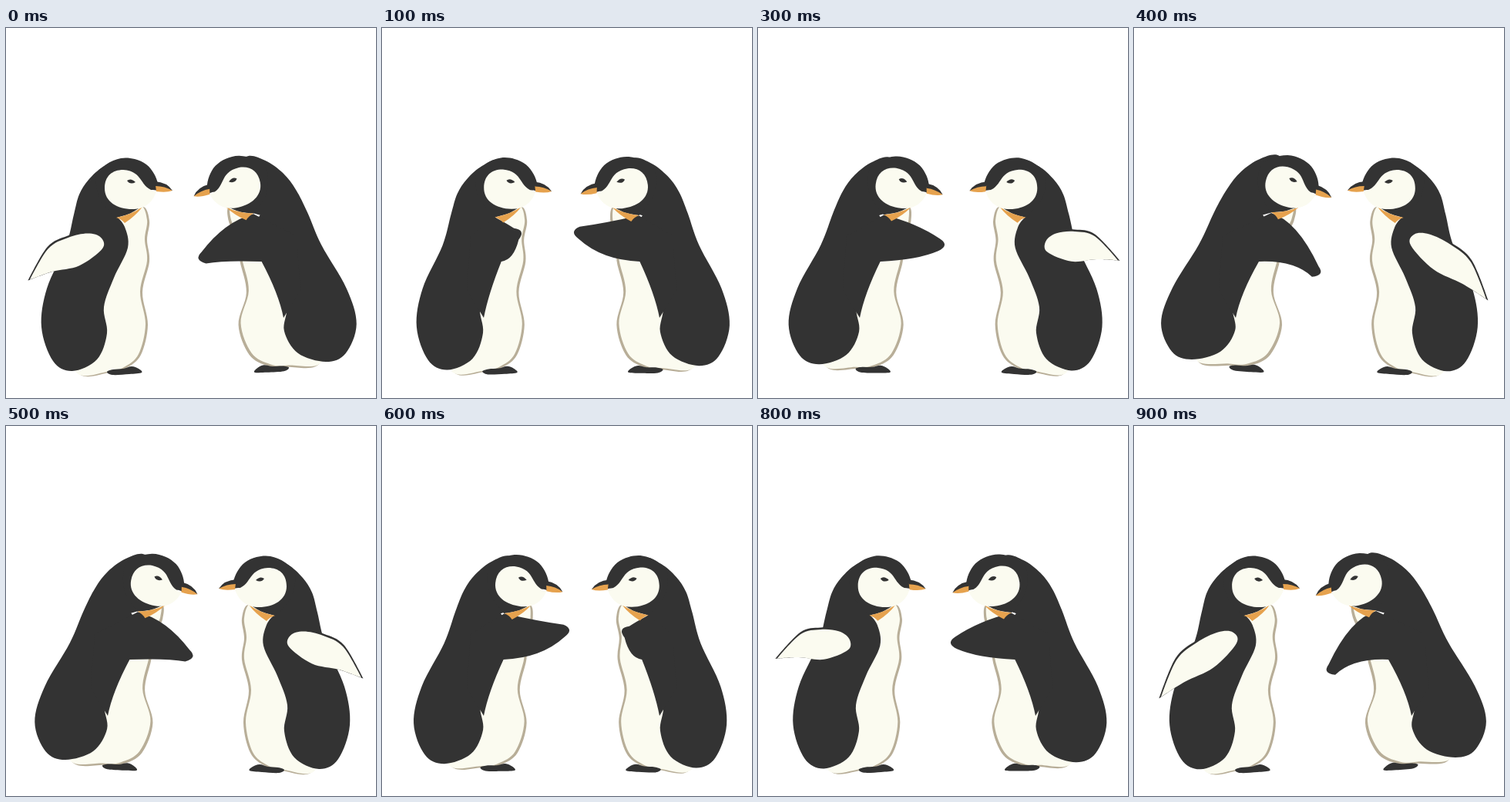
Write an HTML page that moves like this. It is 480 px wide and 480 px high and loops after 1 s.

```html
<!DOCTYPE html>
<html lang="en">
<head>
<meta charset="utf-8">
<title>Two penguins</title>
<style>
html, body { margin: 0; width: 100%; height: 100%; overflow: hidden; background: #fff; }
svg { display: block; width: 100vw; height: 100vh; }
</style>
</head>
<body>
<svg viewBox="0 0 480 480">
  <g id="left"></g>
  <g id="right" transform="translate(492 0) scale(-1 1)"></g>
</svg>
<script>
const DARK = '#333333', CREAM = '#fbfbf0', SHADE = '#b8ae98', ORANGE = '#e6a24e';
const STEP = 100;

const clamp = (v, lo, hi) => Math.min(hi, Math.max(lo, v));
const str = p => p.map(v => v.toFixed(2)).join(' ');
const shape = (d, fill) => `<path d="${d}" fill="${fill}"/>`;
const pts = text => text.trim().split(/,\s*/).map(p => p.split(' ').map(Number));

// Closed Catmull-Rom curve; corners listed in `sharp` get no tangent.
function smooth(p, sharp = []) {
  const n = p.length, at = i => p[(i + n) % n];
  const slope = i => sharp.includes(i % n) ? [0, 0]
    : [0, 1].map(j => (at(i + 1)[j] - at(i - 1)[j]) / 6);
  let d = 'M' + str(p[0]);
  for (let i = 0; i < n; i++) {
    const a = at(i), b = at(i + 1), s = slope(i), e = slope(i + 1);
    d += 'C' + str([a[0] + s[0], a[1] + s[1], b[0] - e[0], b[1] - e[1], ...b]);
  }
  return d + 'Z';
}

// Upright outlines; bend() leans them.
const body = pts(`149 172, 126 180, 107 197, 95 216, 88 242, 78 282, 53 338, 46 388,
  61 432, 86 445, 118 430, 131 396, 127 362, 140 324, 158 285, 154 258, 143 244, 177 232, 168 200`);
const belly = pts(`177 232, 186 250, 183 275, 186 303, 177 343, 184 385, 175 424, 156 441,
  135 447, 92 444, 100 350, 150 255`);
const foot = smooth(pts('131 446, 139 443, 152 442, 163 439, 172 442, 176 447, 160 449, 138 450'));

// The chest sways forward, the hips push back and the rear lifts.
function bend([x, y], k) {
  const up = clamp(320 - y, 0, 110) / 80, low = Math.max(0, y - 320) / 125;
  const sway = 26 * up ** 1.4 * clamp(.65 + (x - 90) / 130, .65, 1);
  const hips = 9 * Math.sin(2.6 * low) * (x - 115) / 65 - 9 * low ** 3;
  const lift = 14 * ((y - 310) / 130) ** 2 * clamp((170 - x) / 60, 0, 1);
  return [x + k * (sway + hips), y - k * lift];
}

const head =
  shape(smooth(pts(`117 192, 130 177, 149 169, 167 170, 182 177, 192 189, 197 202, 196 211,
    185 212, 172 234, 160 241, 143 246, 122 222`), [7, 9, 11]), DARK) +
  shape('M143 246Q163 242 177 232Q168 244 154 253Q150 248 143 246Z', ORANGE) +
  shape('M128 208C128 192 138 184 152 184C180 186 172 208 195 212C190 228 178 235 164 235C144 235 128 225 128 208Z', CREAM) +
  shape('M157 198Q162 194 168 200Q161 204 157 198Z', DARK) +
  shape('M194 204Q207 204 216 211Q208 214 195 212Z', ORANGE) +
  shape('M193 199Q209 200 216 211Q206 205 194 205Z', DARK);

function frontWing(k, x, y) {
  const top = [143 + 35 * k, 246 - 6 * k], root = [154 + 8 * k, 303];
  const a = Math.atan2(y - 270, x - 165), c = Math.cos(a), s = Math.sin(a);
  const near = h => [x - 11 * c + h * s, y - 11 * s - h * c];
  return shape(`M${str(top)}Q${str([top[0] + (x - top[0]) / 2, top[1] + 10])} ${str(near(7))}` +
    `Q${x + 3} ${y} ${str(near(-9))}` +
    `Q${str([root[0] + (x - root[0]) * .55, 301])} ${str(root)}` +
    'Q138 345 132 376L110 340L115 270Z', DARK);
}

// A leaf along the line from tip to shoulder: share of length, height above it.
const leaf = pts('0 0, .38 26, .65 28, .88 22, 1 10, .96 -4, .63 -11, .31 -3');

function backWing(x, y) {
  const dx = 98 + .28 * (y - 302) - (x - 22), dy = 286 - .2 * (y - 302) - y;
  const len = Math.hypot(dx, dy);
  const place = rim => leaf.map(([t, h]) => {
    const up = h > 0 ? h + rim : h, along = t || .03 - rim / 100;
    return [x + dx * along + dy / len * up, y + dy * along - dx / len * up];
  });
  return shape(smooth(place(2.5), [0]), DARK) + shape(smooth(place(0), [0]), CREAM);
}

// Key poses: lean, then wing tip.
const poses = [
  [0, 28, 328], [.1, 184, 262], [.3, 232, 260], [.58, 246, 282], [1, 245, 321],
  [.8, 246, 301], [.45, 247, 264], [.18, 190, 262], [.04, 22, 302], [-.02, 32, 354]
];

function penguin([k, x, y]) {
  const chest = smooth(belly.map(p => bend(p, k)));
  return shape(chest, SHADE) +
    `<g transform="translate(-3 ${-1 - 1.5 * k})">${shape(chest, CREAM)}</g>` +
    `<g transform="translate(${-8 * k} ${-2 * k}) rotate(${8 * k} 165 447)">${shape(foot, DARK)}</g>` +
    shape(smooth(body.map(p => bend(p, k)), [16, 17]), DARK) +
    (x < 100 ? '' : frontWing(k, x, y)) +
    `<g transform="translate(${44 * k} ${-2 * k}) rotate(${12 * k} 162 199)">${head}</g>` +
    (x < 100 ? backWing(x, y) : '');
}

const left = document.getElementById('left'), right = document.getElementById('right');
const drawn = poses.map(penguin), steps = drawn.length;
let shown = -1;

// The right bird mirrors the left one, half a loop apart.
function draw(time) {
  const step = Math.floor(time / STEP) % steps;
  if (step === shown) return;
  shown = step;
  left.innerHTML = drawn[step];
  right.innerHTML = drawn[(step + steps / 2) % steps];
}

const start = performance.now();
function tick() {
  draw(performance.now() - start);
  requestAnimationFrame(tick);
}
tick();
</script>
</body>
</html>
```
